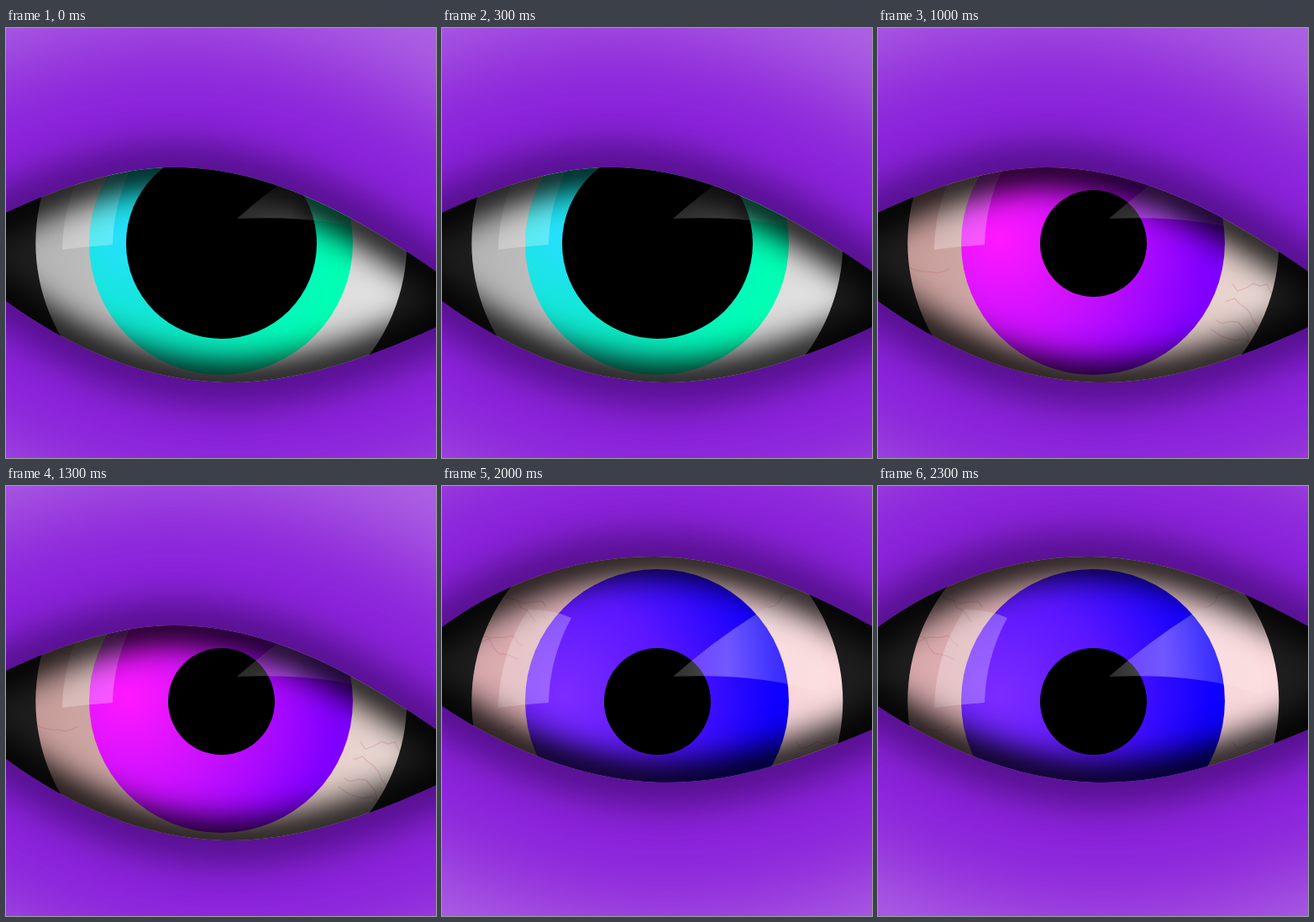
An HTML page that plays this animation: 512x512 px, repeating every 2.5 s.

```html
<!DOCTYPE html>
<html lang="en">
<head>
<meta charset="utf-8">
<title>Eye</title>
<style>
html, body { margin: 0; width: 100%; height: 100%; overflow: hidden; background: #8b24dc; }
svg { display: block; width: 100vw; height: 100vh; }
</style>
</head>
<body>
<svg viewBox="0 0 512 512" preserveAspectRatio="none">
  <defs>
    <filter id="wide" filterUnits="userSpaceOnUse" x="-300" y="-300" width="1112" height="1112" color-interpolation-filters="sRGB"><feGaussianBlur stdDeviation="55"/></filter>
    <filter id="near" filterUnits="userSpaceOnUse" x="-300" y="-300" width="1112" height="1112" color-interpolation-filters="sRGB"><feGaussianBlur stdDeviation="25"/></filter>
    <filter id="inner" filterUnits="userSpaceOnUse" x="-300" y="-300" width="1112" height="1112" color-interpolation-filters="sRGB"><feGaussianBlur stdDeviation="19"/></filter>
    <clipPath id="open"><path class="lid"/></clipPath>
    <clipPath id="ball"><circle cx="256.3" cy="256" r="221"/></clipPath>
    <linearGradient id="white" gradientUnits="userSpaceOnUse" x1="36" y1="0" x2="460" y2="0">
      <stop/><stop offset="1"/>
    </linearGradient>
    <radialGradient id="iris" gradientUnits="userSpaceOnUse" cx="145" cy="250" r="250">
      <stop/><stop offset=".5"/><stop offset="1"/>
    </radialGradient>
    <linearGradient id="shine" gradientUnits="userSpaceOnUse" x1="275" y1="0" x2="460" y2="0">
      <stop stop-color="#fff" stop-opacity=".18"/>
      <stop offset=".35" stop-color="#fff" stop-opacity=".32"/>
      <stop offset="1" stop-color="#fff" stop-opacity=".06"/>
    </linearGradient>
  </defs>

  <rect width="512" height="512" fill="#ae64e4"/>
  <path class="lid" fill="#8a22da" stroke="#8a22da" stroke-width="330" stroke-linejoin="round" filter="url(#wide)"/>
  <path class="lid" fill="none" stroke="#3e086c" stroke-width="42" stroke-linejoin="round" filter="url(#near)"/>
  <path id="crease" d="M-2 249L28 234L38 241Q16 249 -2 263Z" fill="#26083e" opacity=".75"/>

  <g clip-path="url(#open)">
    <rect width="512" height="512" fill="#1e1e1e"/>
    <g clip-path="url(#ball)">
      <rect width="512" height="512" fill="url(#white)"/>
      <path id="veins" fill="none" stroke="#b8505c" stroke-width="1.5" opacity=".2"/>
    </g>
    <circle cx="256" cy="256" r="157" fill="url(#iris)"/>
    <circle id="pupil" cx="256.5" cy="256.5"/>
    <path d="M67 264Q68 200 103 147Q131 147 154 157Q128 205 127 258Q97 260 67 264Z" fill="#fff" opacity=".27"/>
    <path d="M275 227Q320 187 375 152L415 126Q457 180 458 248Q380 222 275 227Z" fill="url(#shine)"/>
    <path class="lid" fill="none" stroke="#000" stroke-width="44" stroke-linejoin="round" filter="url(#inner)"/>
  </g>
</svg>
<script>
const STEP = 500;
const $ = s => document.querySelector(s);
const all = s => document.querySelectorAll(s);

const relaxed = 'M-80 268L0 220C60 192 130 166 200 166C300 166 400 211 512 290' +
  'L590 345L512 356C430 394 345 422 268 422C170 422 80 383 0 325Z';
const narrow = 'M24 238C80 196 160 167 246 167C335 167 420 204 512 250' +
  'L590 290L512 306C440 331 375 347 312 347C205 347 115 305 36 241Z';
const wide = 'M-80 216L0 168C70 117 155 84 250 84C335 84 420 116 512 167' +
  'L590 210L512 290C435 322 355 353 268 353C170 353 75 312 0 262Z';

const looks = [
  { lid: relaxed, pupil: 113.5, white: ['#b4b4b4', '#e4e4e4'], iris: ['#27dfff', '#0ce9c6', '#00ffb4'] },
  { lid: relaxed, pupil: 113.5, white: ['#bd959c', '#e6d4d8'], iris: ['#cdff00', '#f8e000', '#ffc400'], veins: true },
  { lid: relaxed, pupil: 63.5, white: ['#c79c99', '#ecdad5'], iris: ['#ff18ff', '#c610ff', '#8000ff'], veins: true },
  { lid: narrow, pupil: 63.5, white: ['#a8a8a8', '#e0e0e0'], iris: ['#c6ff0c', '#f4f400', '#ffc000'], crease: true },
  { lid: wide, pupil: 63.5, white: ['#d8a8ac', '#fcdcdf'], iris: ['#7c2cff', '#5a16ff', '#1000ff'], veins: true }
];

// Veins wander from the rim of the eyeball towards the iris.
function veins(count) {
  let seed = 7, d = '';
  const rand = () => (seed = seed * 16807 % 2147483647) / 2147483647;
  for (let i = 0; i < count; i++) {
    let angle = (i % 2) * Math.PI + (rand() - 0.5) * 1.4;
    for (let r = 221; r > 165; r -= 8) {
      const x = 256 + r * Math.cos(angle), y = 256 + r * Math.sin(angle);
      d += `${r === 221 ? 'M' : 'L'}${x.toFixed(1)} ${y.toFixed(1)}`;
      angle += (rand() - 0.5) * 0.1;
    }
  }
  return d;
}

function paint(id, colors) {
  all(`#${id} stop`).forEach((s, i) => s.setAttribute('stop-color', colors[i]));
}

function show(id, on) {
  $(id).style.display = on ? '' : 'none';
}

let shown;
function draw(time) {
  const look = looks[Math.floor(time / STEP) % looks.length];
  if (look === shown) return;
  shown = look;
  all('.lid').forEach(p => p.setAttribute('d', look.lid));
  paint('white', look.white);
  paint('iris', look.iris);
  $('#pupil').setAttribute('r', look.pupil);
  show('#veins', look.veins);
  show('#crease', look.crease);
}

$('#veins').setAttribute('d', veins(10));
const start = performance.now();
function tick() {
  draw(performance.now() - start);
  requestAnimationFrame(tick);
}
tick();
</script>
</body>
</html>
```
